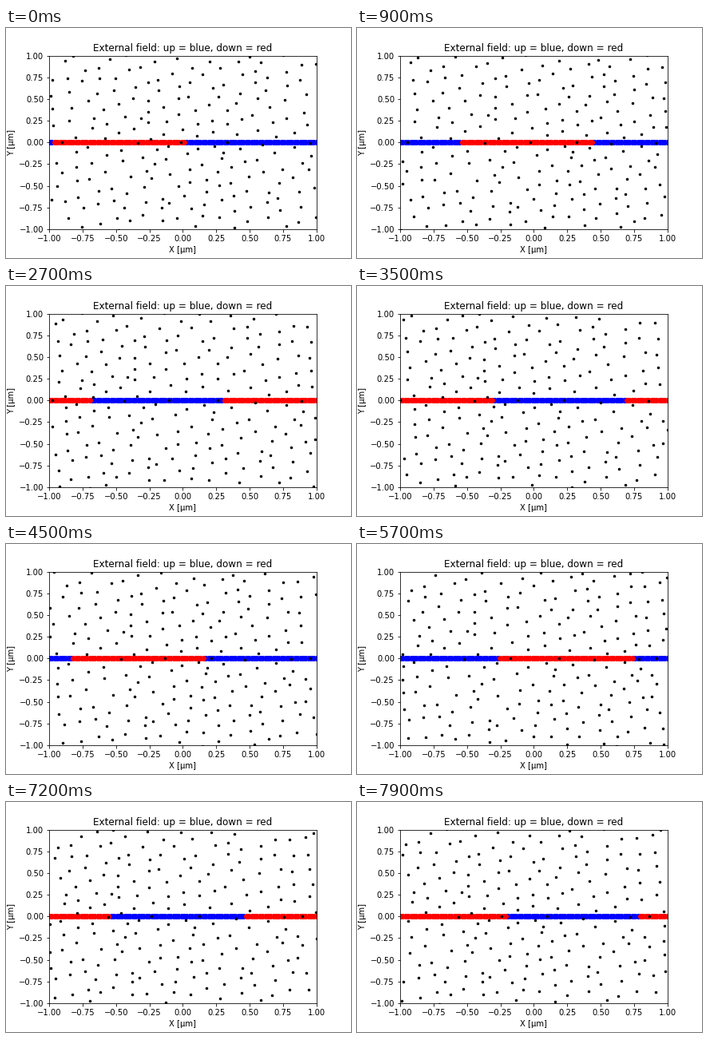
These frames come from a looping animation (432 by 288 pixels, 8 s). A matplotlib script:

```python
import numpy as np
import matplotlib.pyplot as plt
from matplotlib.animation import FuncAnimation

FRAMES, INTERVAL = 80, 100
OMEGA = 0.15              # wave phase per step
SPEED = OMEGA / np.pi     # wavelength is 2 µm
RED_START = -0.979
DRIFT = 0.0029            # leftward tracer drift per step
SWAY, LIFT = 0.014, 0.036

rng = np.random.default_rng(11)


def tracer_grid(cols=17, rows=16, dy=0.168):
    """Staggered, slightly slanted columns with a little jitter."""
    i, j = np.meshgrid(np.arange(cols), np.arange(rows) - rows / 2)
    x = -1 + 2 * (i + 0.5) / cols
    y = (j + i * 0.382 % 1) * dy
    x = x - 0.07 * y + rng.normal(0, 0.024, x.shape)
    y = y + rng.normal(0, 0.02, y.shape)
    return x.ravel(), y.ravel()


def tracer_positions(t):
    x = (x0 - DRIFT * t + 1) % 2 - 1
    phase = np.pi * (x - RED_START - 0.5 - SPEED * t)
    side = np.tanh(4 * y0)
    px = x + SWAY * np.cos(phase)
    py = y0 - LIFT * side * np.sin(phase)
    return (px + 1) % 2 - 1, py


x0, y0 = tracer_grid()
sheet = np.linspace(-1, 1, 100)

fig, ax = plt.subplots(figsize=(6, 4), dpi=72)
fig.subplots_adjust(bottom=0.125)
ax.set(xlim=(-1, 1), ylim=(-1, 1), xlabel="X [µm]", ylabel="Y [µm]",
       title="External field: up = blue, down = red")
up, = ax.plot([], [], "bo", ms=6)
down, = ax.plot([], [], "ro", ms=6)
tracers, = ax.plot([], [], "k.", ms=5)


def update(t):
    red = (sheet - RED_START - SPEED * t) % 2 < 1
    up.set_data(sheet[~red], np.zeros(np.sum(~red)))
    down.set_data(sheet[red], np.zeros(np.sum(red)))
    tracers.set_data(*tracer_positions(t))
    return up, down, tracers


anim = FuncAnimation(fig, update, frames=FRAMES, interval=INTERVAL,
                     repeat=True, repeat_delay=0)
plt.show()
```
